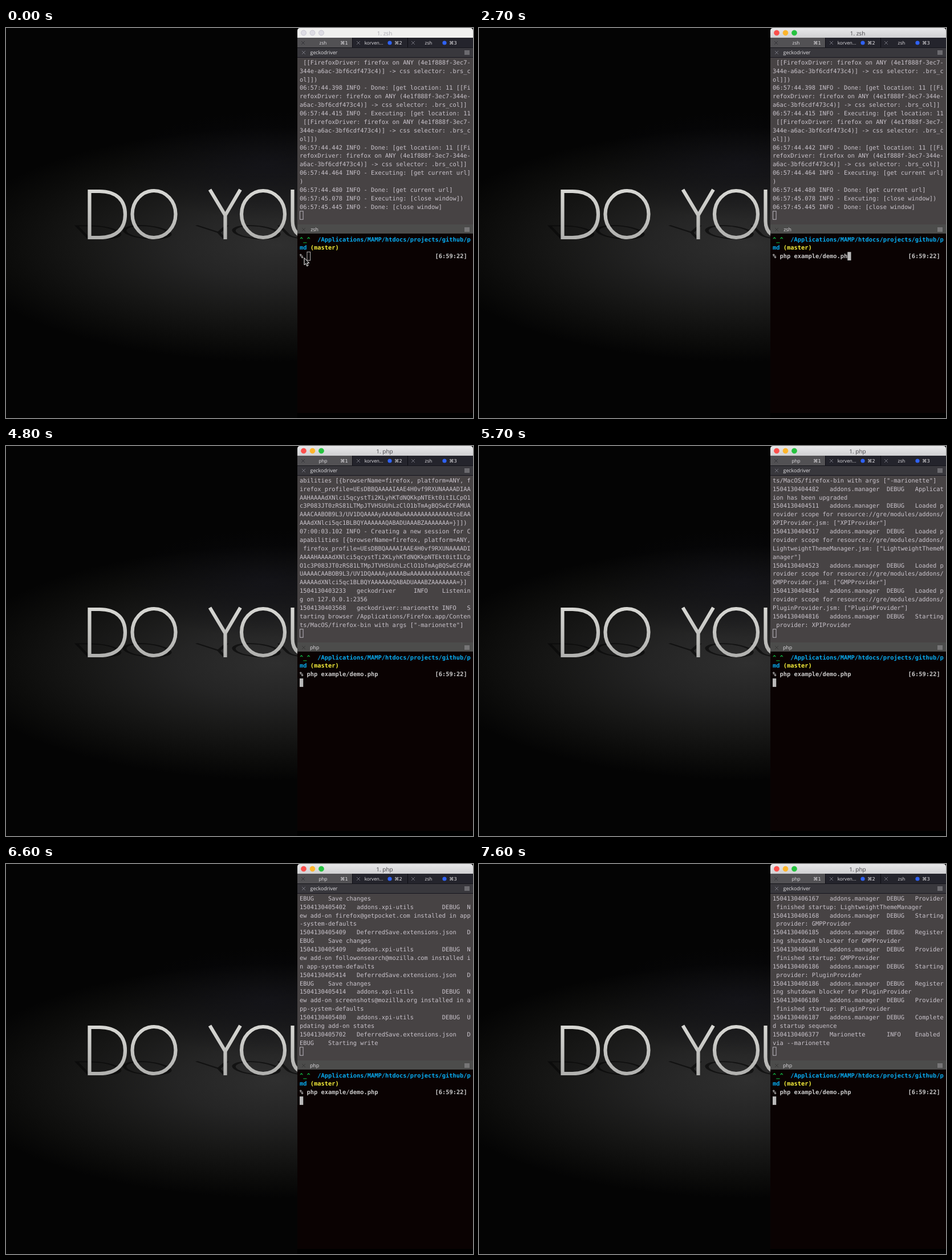
These frames come from a looping animation (819 px wide and 683 px high, 8 s). An HTML page:

```html
<!DOCTYPE html>
<html lang="en">
<head>
<meta charset="utf-8">
<title>Terminal demo</title>
<style>
  html, body { margin: 0; width: 100%; height: 100%; overflow: hidden; background: #000; }
  svg { display: block; }
  text { white-space: pre; text-rendering: geometricPrecision; }
  .mono { font: 10.381px "DejaVu Sans Mono", monospace; }
  .ui { font: 8.2px "Open Sans", "Noto Sans", sans-serif; fill: #e2e0e4; text-anchor: middle; }
  .pane { font-size: 8.8px; }
  .key { font-family: "DejaVu Sans", sans-serif; }
  .bold { font-weight: bold; }
</style>
</head>
<body>
<svg id="stage" width="819" height="683" viewBox="0 0 819 683">
  <defs>
    <radialGradient id="floor">
      <stop offset="0" stop-color="#2f2f2f"/>
      <stop offset=".3" stop-color="#252525"/>
      <stop offset=".6" stop-color="#171716"/>
      <stop offset=".85" stop-color="#0b0b0a"/>
      <stop offset="1" stop-color="#040404"/>
    </radialGradient>
    <radialGradient id="haze">
      <stop offset="0" stop-color="#14141c" stop-opacity=".6"/>
      <stop offset="1" stop-color="#0a0a10" stop-opacity="0"/>
    </radialGradient>
    <linearGradient id="metal" gradientUnits="userSpaceOnUse" x1="0" y1="282" x2="0" y2="370">
      <stop offset="0" stop-color="#d8d8d4"/>
      <stop offset="1" stop-color="#b0b0ae"/>
    </linearGradient>
    <linearGradient id="bar" x2="0" y2="1">
      <stop offset="0" stop-color="#e8e8ea"/>
      <stop offset="1" stop-color="#d0d0d2"/>
    </linearGradient>
    <g id="letters" fill="none" stroke-width="6.2">
      <path d="M146.5 286H164C194 286 209 302 209 326.5S194 367 164 367H146.5Z"/>
      <ellipse cx="259.5" cy="326" rx="38" ry="41"/>
      <path d="M357.5 283L384.5 328L411 283M384.5 327V370"/>
      <ellipse cx="451" cy="326" rx="38" ry="41"/>
      <path d="M502.5 283V338Q502.5 364 530 367"/>
    </g>
  </defs>

  <rect width="819" height="683" fill="#040404"/>
  <ellipse cx="475" cy="380" rx="565" ry="205" fill="url(#floor)"/>
  <ellipse cx="460" cy="240" rx="260" ry="95" fill="url(#haze)"/>
  <use href="#letters" transform="matrix(1 0 .27 .28 -99.9 266.4)" stroke="#070707" opacity=".65"/>
  <use href="#letters" stroke="url(#metal)"/>

  <rect x="511" width="308" height="683"/>
  <rect x="511" y="360" width="308" height="314" fill="#0a0202"/>
  <path id="titlebar" d="M511 17V5Q511 0 516 0H814Q819 0 819 5V17Z"/>
  <g id="lights"></g>
  <text id="title" class="ui" x="664" y="12.5" style="font-size:10px"></text>
  <g id="chrome"></g>
  <rect x="511" y="52" width="308" height="292" fill="#474344"/>
  <g id="log" class="mono" fill="#cac4cc"></g>
  <rect x="515.5" y="320.8" width="5.6" height="14.4" fill="none" stroke="#b9b5bc"/>
  <g id="prompt" class="mono"></g>
  <rect id="cursor" height="14.8"/>
  <path id="pointer" d="M523 402.5V415L525.8 412.4L527.8 417L530 416L528 411.6H531.8Z" fill="#111" stroke="#fff"/>
</svg>
<script>
const COLS = 48, ROWS = 18, LEFT = 515, CELL = 6.25, LEADING = 14.87, LOOP = 8000;
const FOCUS = 700, TYPING = 1100, ENTER = 3800, RUNNING = 4400;
const $ = id => document.getElementById(id);

function add(parent, tag, attrs, text = "") {
  const el = document.createElementNS("http://www.w3.org/2000/svg", tag);
  for (const key in attrs) el.setAttribute(key, attrs[key]);
  el.textContent = text;
  parent.append(el);
  return el;
}

// Terminal wrapping: tab stops every 8 columns, held at the last column.
function wrap(record) {
  const lines = [""];
  for (const ch of record) {
    const line = lines.pop();
    if (ch === "\t") lines.push(line.padEnd(Math.min(COLS - 1, (Math.floor(line.length / 8) + 1) * 8)));
    else if (line.length === COLS) lines.push(line, ch);
    else lines.push(line + ch);
  }
  return lines;
}

const history = [];
const put = (time, record) => wrap(record).forEach(line => history.push({ time, line }));
const trace = (time, stamp, source, level, msg) =>
  put(time, ["1504130" + stamp, source, level, msg].join("\t"));
const info = (time, clock, msg) => put(time, `${clock} INFO - ${msg}`);
const manager = (time, stamp, msg) => trace(time, stamp, "addons.manager", "DEBUG", msg);
const xpi = (time, stamp, msg) => trace(time, stamp, "addons.xpi", "DEBUG", msg);

function installed(time, stamp, id) {
  trace(time, stamp, "DeferredSave.extensions.json", "DEBUG", "Save changes");
  trace(time, stamp, "addons.xpi-utils", "DEBUG", `New add-on ${id} installed in app-system-defaults`);
}
function register(time, stamp, id) {
  xpi(time, stamp, `Registering manifest for /Applications/Firefox.app/Contents/Resources/browser/features/${id}.xpi`);
}
function boot(time, stamp, id, version) {
  xpi(time, stamp, `Calling bootstrap method startup on ${id} version ${version}`);
}

const locate = "[get location: 11 [[FirefoxDriver: firefox on ANY (4e1f888f-3ec7-344e-a6ac-3bf6cdf473c4)] -> css selector: .brs_col]]";
info(0, "06:57:44.376", `Executing: ${locate})`);
info(0, "06:57:44.398", `Done: ${locate}`);
info(0, "06:57:44.415", `Executing: ${locate})`);
info(0, "06:57:44.442", `Done: ${locate}`);
info(0, "06:57:44.464", "Executing: [get current url])");
info(0, "06:57:44.480", "Done: [get current url]");
info(0, "06:57:45.078", "Executing: [close window])");
info(0, "06:57:45.445", "Done: [close window]");

const profile = "UEsDBBQAAAAIAAE4H0vf9RXUNAAAADIAAAAHAAAAdXNlci5qcystTi2KLyhKTdNQKkpNTEkt0itILCp" +
  "O1c3P083JT0zRS81LTMpJTVHSUUhLzClO1bTmAgBQSwECFAMUAAAACAABOB9L3/UV1DQAAAAyAAAABw" +
  "A".repeat(14) + "toEAAAAAdXNlci5qc1BLBQYAAAAAAQABADUAAABZAAAAAAA=";
const caps = `Capabilities [{browserName=firefox, platform=ANY, firefox_profile=${profile}}]`;
info(4100, "07:00:03.094", `Executing: [new session: ${caps}])`);
info(4100, "07:00:03.102", `Creating a new session for ${caps}`);
trace(4100, "403233", "geckodriver", "INFO", "Listening on 127.0.0.1:2356");
trace(4800, "403568", "geckodriver::marionette", "INFO",
  'Starting browser /Applications/Firefox.app/Contents/MacOS/firefox-bin with args ["-marionette"]');

const clickToPlay = "clicktoplay-rollout@mozilla.org", e10s = "e10srollout@mozilla.org",
  pocket = "firefox@getpocket.com", search = "followonsearch@mozilla.com", shots = "screenshots@mozilla.org";
const scope = name => `Loaded provider scope for resource://gre/modules/addons/${name}.jsm: ["${name}"]`;
manager(5300, "404482", "Application has been upgraded");
manager(5300, "404511", scope("XPIProvider"));
manager(5400, "404517", scope("LightweightThemeManager"));
manager(5400, "404523", scope("GMPProvider"));
manager(5700, "404814", scope("PluginProvider"));
manager(5700, "404816", "Starting provider: XPIProvider");
xpi(5800, "404905", "startup");
xpi(5800, "404911", "checkForChanges");
trace(6100, "405210", "addons.xpi-utils", "DEBUG", "Opening XPI database");
installed(6200, "405388", clickToPlay);
installed(6300, "405395", e10s);
installed(6300, "405402", pocket);
installed(6300, "405409", search);
installed(6300, "405414", shots);
trace(6400, "405480", "addons.xpi-utils", "DEBUG", "Updating add-on states");
trace(6600, "405702", "DeferredSave.extensions.json", "DEBUG", "Starting write");
xpi(6700, "405810", "New installation, updating add-on state");
register(6700, "405812", clickToPlay);
boot(6800, "405814", clickToPlay, "1.2");
register(6800, "405964", e10s);
boot(6800, "405965", e10s, "2.0");
register(6800, "405966", pocket);
boot(6800, "405967", pocket, "1.0.5");
register(7000, "406105", search);
boot(7000, "406107", search, "0.8.0");
register(7100, "406142", shots);
boot(7100, "406145", shots, "6.6.0");
manager(7200, "406165", "Provider finished startup: XPIProvider");
manager(7200, "406166", "Starting provider: LightweightThemeManager");
manager(7200, "406167", "Provider finished startup: LightweightThemeManager");
manager(7200, "406168", "Starting provider: GMPProvider");
manager(7200, "406185", "Registering shutdown blocker for GMPProvider");
manager(7200, "406186", "Provider finished startup: GMPProvider");
manager(7200, "406186", "Starting provider: PluginProvider");
manager(7200, "406186", "Registering shutdown blocker for PluginProvider");
manager(7200, "406186", "Provider finished startup: PluginProvider");
manager(7200, "406187", "Completed startup sequence");
trace(7400, "406377", "Marionette", "INFO", "Enabled via --marionette");

// Typed characters: when each count is reached.
const command = "php example/demo.php";
const keys = [[1100, 1], [1200, 2], [1300, 3], [1500, 4], [1600, 5], [1800, 12],
  [2000, 13], [2100, 14], [2200, 15], [2300, 16], [2400, 17], [2500, 18], [2700, 19], [2800, 20]];

function buildChrome() {
  const g = $("chrome");
  const rect = (x, y, width, height, fill) => add(g, "rect", { x, y, width, height, fill });
  const label = (x, y, text, cls = "") => add(g, "text", { class: "ui " + cls, x, y }, text);
  const cross = (x, y, stroke) =>
    add(g, "path", { d: `M${x - 3} ${y - 3}l6 6m0 -6l-6 6`, stroke, "stroke-width": .8 });
  const menu = y => add(g, "path", { d: `M804 ${y - 3}h9m-9 2h9m-9 2h9m-9 2h9`, stroke: "#aaa9ac", "stroke-width": .9 });

  rect(511, 17, 308, 17, "#24242c");
  rect(511, 17, 96, 17, "#525154");
  rect(607, 17, 1, 17, "#0c0c12");
  rect(704, 17, 1, 17, "#0c0c12");
  rect(511, 34, 308, 17, "#39383d");
  rect(511, 34, 308, 1, "#15151b");
  rect(511, 51, 308, 1, "#17151e");
  rect(511, 344, 308, 16, "#4c4c4b");
  [[521, 26, "#2c2c30"], [618, 26, "#85858e"], [714, 26, "#85858e"], [522, 43, "#85858e"], [522, 353, "#343433"]]
    .forEach(c => cross(...c));
  menu(43);
  menu(353);
  [673, 769].forEach(cx => add(g, "circle", { cx, cy: 26, r: 3.6, fill: "#2f62f5" }));
  [593, 688, 784].forEach((x, i) => label(x, 29, "⌘" + (i + 1), "key"));
  label(645, 29, "korven...");
  label(741, 29, "zsh");
  label(557.5, 46, "geckodriver", "pane");
  return [label(556, 29, "zsh"), label(541, 355.6, "zsh", "pane")];
}

const jobs = [...buildChrome(), $("title")];
const lights = [["#fb4f4c", 522], ["#fdb52b", 537.5], ["#25c33f", 553]].map(([color, cx]) =>
  ({ color, el: add($("lights"), "circle", { cx, cy: 8.5, r: 4.5 }) }));
const rows = Array.from({ length: ROWS }, (_, i) =>
  add($("log"), "text", { x: LEFT, y: 63.8 + i * LEADING }));
const say = (col, row, fill, text) =>
  add($("prompt"), "text", { x: LEFT + col * CELL, y: 373.6 + row * LEADING, fill, class: "bold" }, text);
say(0, 0, "#12c94b", "^_^");
say(5, 0, "#08aef5", "/Applications/MAMP/htdocs/projects/github/p");
say(0, 1, "#08aef5", "md");
say(3, 1, "#f6ef3b", "(master)");
say(38, 2, "#c9c9c9", "[6:59:22]");
const input = say(0, 2, "#c9c9c9", "% ");

function set(el, attrs) {
  for (const key in attrs) el.setAttribute(key, attrs[key]);
}

function draw(t) {
  const active = t >= FOCUS;
  const job = t >= RUNNING ? "php" : "zsh";
  jobs.forEach((el, i) => el.textContent = (i === 2 ? "1. " : "") + job);
  $("title").style.fill = active ? "#454448" : "#a9a8b0";
  set($("titlebar"), { fill: active ? "url(#bar)" : "#f0f0ef" });
  for (const { color, el } of lights)
    set(el, { fill: active ? color : "#dedde4", stroke: active ? color : "#bbb9c6", "stroke-width": .7 });

  const shown = history.filter(entry => entry.time <= t).slice(-ROWS);
  rows.forEach((row, i) => row.textContent = shown[i].line);

  const typed = keys.reduce((n, [time, count]) => t >= time ? count : n, 0);
  input.textContent = "% " + command.slice(0, typed);
  const entered = t >= ENTER;
  const col = entered ? 0 : 2 + typed;
  set($("cursor"), {
    x: LEFT + col * CELL + (active ? 0 : .5),
    y: 392.2 + (entered ? LEADING : 0),
    width: active ? 6.25 : 5.6,
    fill: active ? "#bababa" : "none",
    stroke: active ? "none" : "#bababa"
  });
  set($("pointer"), { visibility: t < TYPING ? "visible" : "hidden" });
}

const start = performance.now();
function tick() {
  draw((performance.now() - start) % LOOP);
  requestAnimationFrame(tick);
}
draw(0);
requestAnimationFrame(tick);
</script>
</body>
</html>
```
